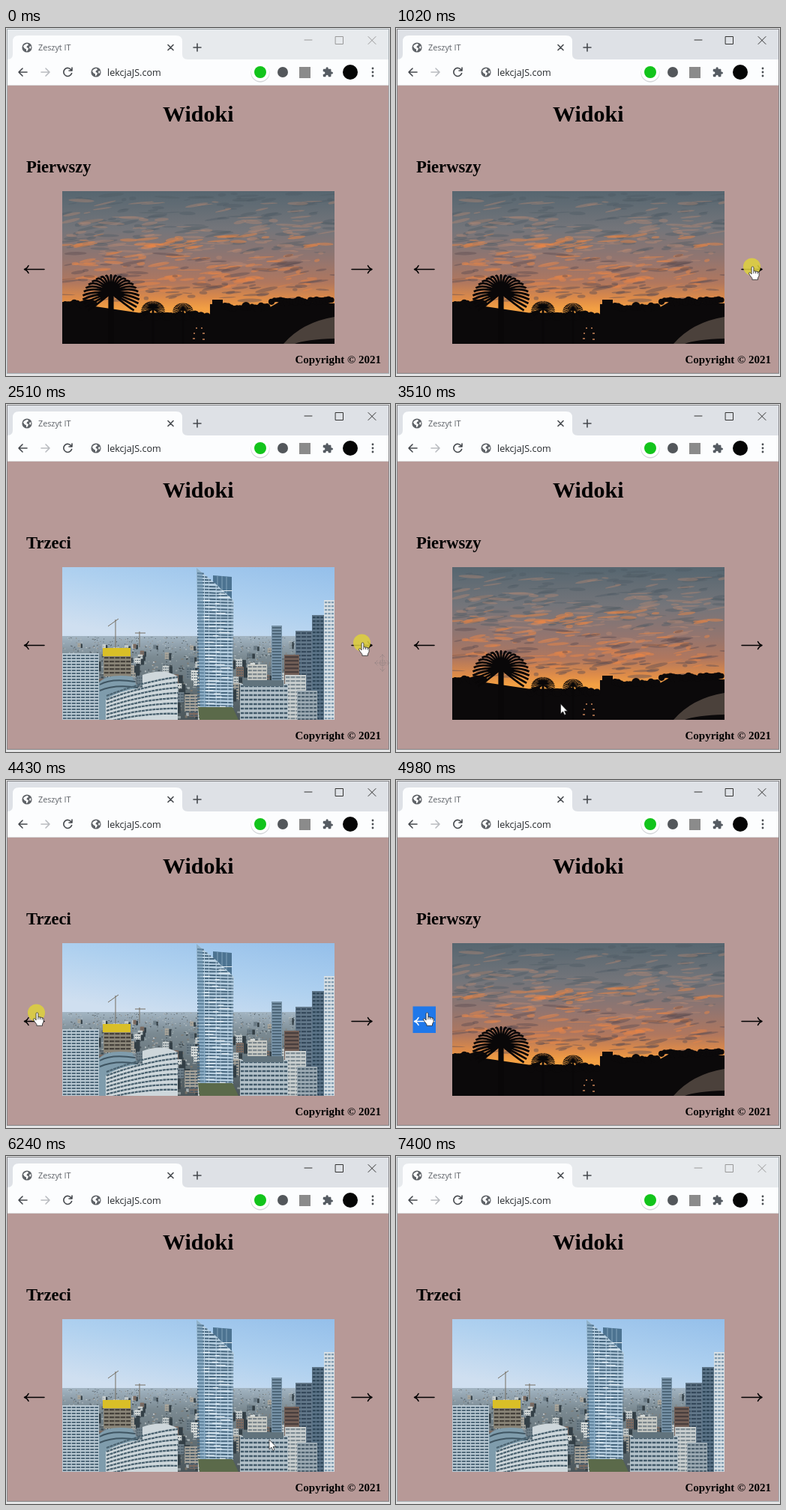
Animation, 512 px wide and 465 px high, one loop 7490 ms. Source, as an HTML page:

```html
<!DOCTYPE html>
<html lang="pl">
<head>
<meta charset="utf-8">
<title>Widoki</title>
<style>
  html, body { margin: 0; width: 100%; height: 100%; overflow: hidden; background: #e4e4e5; }
  svg { display: block; width: 512px; height: 465px; }
  .ui { font-family: "Open Sans", "Noto Sans", sans-serif; }
  .page { font-family: "Liberation Serif", serif; font-weight: bold; }
  .line { fill: none; stroke-linecap: round; stroke-linejoin: round; }
</style>
</head>
<body>
<svg viewBox="0 0 512 465">
  <defs>
    <clipPath id="frame"><rect x="75" y="218" width="363" height="204"/></clipPath>
    <linearGradient id="dusk" x2="0" y2="1">
      <stop offset="0" stop-color="#566670"/><stop offset=".25" stop-color="#74757a"/>
      <stop offset=".45" stop-color="#93756f"/><stop offset=".6" stop-color="#b0775e"/>
      <stop offset=".7" stop-color="#dc8a49"/><stop offset=".77" stop-color="#f3a043"/>
    </linearGradient>
    <linearGradient id="haze" x2="1" y2=".35">
      <stop offset="0" stop-color="#cbdcf1"/><stop offset=".5" stop-color="#dfe6ec"/>
      <stop offset="1" stop-color="#e6e6e3"/>
    </linearGradient>
    <linearGradient id="plain" x2="0" y2="1">
      <stop offset="0" stop-color="#b3bcc4"/><stop offset=".3" stop-color="#9a9f9f"/>
      <stop offset="1" stop-color="#777b77"/>
    </linearGradient>
    <linearGradient id="noon" x1="1" y1="0" x2=".3" y2="1">
      <stop offset="0" stop-color="#94bfea"/><stop offset=".5" stop-color="#aed0ef"/>
      <stop offset="1" stop-color="#cfdff0"/>
    </linearGradient>
    <linearGradient id="streets" x2="0" y2="1">
      <stop offset="0" stop-color="#a3b5c3"/><stop offset=".25" stop-color="#7b8a92"/>
      <stop offset="1" stop-color="#4b565a"/>
    </linearGradient>
    <g id="globe">
      <circle r="6.6" fill="#5f6368"/>
      <path d="M-5 -1.5Q-3 -5 1 -5L2 -3 0 -2 -.5 0 2 1 1 4 -1 5.3V2.5L-3.5 1ZM3 -1L5.2 -2 5.3 1 3.7 2Z" fill="#fff"/>
    </g>
  </defs>

  <rect id="edge" x="1.5" y="1.5" width="509" height="460" fill="#b79997"/>
  <rect id="bar" x="2" y="2" width="508" height="41"/>
  <path d="M2 42Q9 42 9 35V18Q9 10 17 10H227Q235 10 235 18V35Q235 42 242 42H510V76H2Z" fill="#fcfdfe"/>
  <path d="M2 76.5H510" stroke="#d9d6d8"/>

  <g class="ui">
    <use href="#globe" x="28" y="26"/>
    <text x="43" y="30" font-size="10.8" fill="#5c6066">Zeszyt IT</text>
    <use href="#globe" x="120" y="59"/>
    <text x="135" y="63.5" font-size="12.6" fill="#25282c">lekcjaJS.com</text>
  </g>
  <g class="line" stroke="#45494e" stroke-width="1.6">
    <path d="M216 22.5l7 7m0 -7l-7 7M250 26h10m-5 -5v10"/>
    <path d="M28 59H17m5 -5l-5 5 5 5"/>
    <path d="M47 59h11m-5 -5l5 5 -5 5" stroke="#b9bcc0"/>
    <path d="M87 56a5.5 5.5 0 1 0 .6 4.5M88 53v4h-4"/>
  </g>
  <path id="controls" class="line" d="M398 16h10M439.500 11.500h10v10h-10ZM483 11.500l10 10m0 -10l-10 10"/>
  <circle cx="339" cy="60" r="12.5" fill="#d4d6d9"/>
  <circle cx="339" cy="59" r="12" fill="#fff"/>
  <circle cx="339" cy="59" r="8" fill="#12c41b"/>
  <circle cx="369" cy="59" r="7" fill="#53575b"/>
  <rect x="391" y="52" width="15" height="15" fill="#8b8b8b"/>
  <path transform="translate(421.5 51.5) scale(.63)" fill="#555b62" d="M20.5 11H19V7c0-1.1-.9-2-2-2h-4V3.5a2.5 2.5 0 0 0-5 0V5H4c-1.1 0-2 .9-2 2v3.8h1.5a2.7 2.7 0 0 1 0 5.4H2V20c0 1.1.9 2 2 2h3.8v-1.5a2.7 2.7 0 0 1 5.4 0V22H17c1.1 0 2-.9 2-2v-4h1.5a2.5 2.5 0 0 0 0-5z"/>
  <circle cx="459" cy="59" r="10" fill="#050505"/>
  <path class="line" d="M489 54h0m0 5h0m0 5h0" stroke="#4b4f54" stroke-width="2.8"/>

  <g class="page">
    <text x="209" y="125" font-size="30">Widoki</text>
    <text id="caption" x="27" y="193" font-size="22.6"></text>
    <text x="500" y="448" font-size="15" text-anchor="end">Copyright © 2021</text>
  </g>

  <g id="photos" clip-path="url(#frame)"></g>

  <rect id="selection" x="22.5" y="302.5" width="30.5" height="35.5" fill="#1f78ea"/>
  <g class="line" stroke-width="1.5">
    <path id="prev" d="M24.5 322.5H51M30 317.5Q28.500 321 24.500 322.5Q28.500 324 30 327.5"/>
    <path d="M461 322.5H488M482.500 317.5Q484 321 488 322.5Q484 324 482.500 327.5" stroke="#000"/>
  </g>
  <path id="ghost" class="line" d="M502 335v22M492 346h19M499 338l3 -3 3 3M499 354l3 3 3 -3M495 343l-3 3 3 3M508 343l3 3 -3 3M499 343h6v6h-6Z" stroke="#81787a" stroke-dasharray="1 1.7"/>
  <circle id="click" r="11.5" fill="#ddd13c" opacity=".86"/>
  <g id="cursor">
    <path id="arrow" d="M0 0V13L3 10.2 5 14.6 7 13.7 5.1 9.5H9Z" fill="#fff" stroke="#222" stroke-width=".7"/>
    <g id="hand" stroke="#222" stroke-width=".8" stroke-linejoin="round">
      <path d="M-1.4 1.6C-1.4 -.1 1.4 -.1 1.4 1.6V6.2L4 6.4 6.6 7 8.6 8.2V12.5L7 15.5V17.8H-.6V16L-3.6 12 -5 9.4C-5 8 -3.4 7.8 -2.6 9L-1.4 10.4Z" fill="#fff"/>
      <path d="M1.4 6v3.500M4 6.4V9.500M6.6 7V10" fill="none"/>
    </g>
    <path id="beam" d="M-2 -6H2M0 -6V6M-2 6H2" stroke="#111" fill="none"/>
  </g>
</svg>
<script>
const LOOP = 7490;
const $ = id => document.getElementById(id);
const show = (id, on) => $(id).setAttribute('display', on ? 'inline' : 'none');
const set = (id, name, value) => $(id).setAttribute(name, value);

function seeded(seed) {
  return () => {
    seed = (seed + 0x6D2B79F5) | 0;
    let h = Math.imul(seed ^ seed >>> 15, 1 | seed);
    h ^= h + Math.imul(h ^ h >>> 7, 61 | h);
    return ((h ^ h >>> 14) >>> 0) / 4294967296;
  };
}

// SVG pieces as strings
const rect = (x, y, w, h, fill) =>
  `<rect x="${x}" y="${y}" width="${w}" height="${h}" fill="${fill}"/>`;
const shape = (d, fill, extra = '') => `<path d="${d}" fill="${fill}" ${extra}/>`;
const stroke = (d, color, width, extra = '') =>
  shape(d, 'none', `stroke="${color}" stroke-width="${width}" ${extra}`);

// Scattered small blocks, larger towards the viewer
function blocks(seed, count, top, bottom, colors) {
  const rnd = seeded(seed);
  const paths = colors.map(() => '');
  for (let i = 0; i < count; i++) {
    const depth = rnd() ** 1.4;
    const w = 1 + depth * 6 * rnd(), h = .8 + depth * 4 * rnd();
    const x = 75 + rnd() * 363, y = top + depth * (bottom - top);
    paths[i % colors.length] += `M${x.toFixed(1)} ${y.toFixed(1)}h${w.toFixed(1)}v${h.toFixed(1)}h${-w.toFixed(1)}Z`;
  }
  return paths.map((d, i) => shape(d, colors[i], 'opacity=".7"')).join('');
}

function clouds(seed, count, top, bottom, color) {
  const rnd = seeded(seed);
  let out = '';
  for (let i = 0; i < count; i++) {
    const x = 75 + rnd() * 363, y = top + rnd() * (bottom - top);
    out += `<ellipse cx="${x}" cy="${y}" rx="${3 + rnd() * 15}" ry="${.6 + rnd() * 1.9}"
      transform="rotate(${-14 + rnd() * 18} ${x} ${y})" fill="${color}"/>`;
  }
  return out;
}

function palm(x, y, r) {
  const fronds = 25;
  let d = '';
  for (let i = 0; i < fronds; i++) {
    const a = Math.PI * (-.2 + 1.4 * i / (fronds - 1));
    const dx = -Math.cos(a) * r, dy = -Math.sin(a) * r * .8;
    d += `M${x} ${y}Q${x + dx * .7} ${y + dy} ${x + dx * 1.05} ${y + dy + r * .18}`;
  }
  return stroke(d, '#090708', r / 13) + stroke(`M${x} ${y}V422`, '#090708', r / 5);
}

// Uneven treetops along a line
function trees(seed, x0, x1, y) {
  const rnd = seeded(seed);
  let out = '';
  for (let x = x0; x < x1; x += 4)
    out += `<circle cx="${x}" cy="${y + rnd() * 5}" r="${3 + rnd() * 3}" fill="#0b090a"/>`;
  return out;
}

// Facade with rows of windows and optional columns
function tower(x, y, w, wall, glass, gap = 5, cols = 0, bottom = 422) {
  let rows = '', bars = '';
  for (let j = y + 3; j < bottom; j += gap) rows += `M${x + 1} ${j}h${w - 2}`;
  for (let i = 1; i < cols; i++) bars += `M${x + w * i / cols} ${y}V${bottom}`;
  return rect(x, y, w, bottom - y, wall) + stroke(rows, glass, gap * .45) + stroke(bars, wall, 1.2);
}

// Mid-rise houses from the horizon to the front, each with a shaded side
function houses(seed, count) {
  const rnd = seeded(seed);
  const walls = ['#c9cfcf', '#8d9ba3', '#a9a59b', '#6f7f89', '#dce0de', '#7d6c62'];
  let out = '';
  for (let i = 0; i < count; i++) {
    const depth = i / count;
    const x = 75 + rnd() * 355, y = 314 + depth * 78 + rnd() * 6;
    const w = 4 + depth * 12 * (.5 + rnd()), h = 5 + depth * 20 * (.4 + rnd());
    out += tower(x, y, w, walls[i % walls.length], '#4d5e69', 3 + depth, 3, y + h) +
      rect(x + w, y + 1, w * .5, h, '#333f46');
  }
  return out;
}

function sunset() {
  const ground = 'M75 366L112 371 180 381 215 380 250 384 272 383V369H275V363H289V371L330 371 352 373 368 364 400 366 438 368V422H75Z';
  return rect(75, 218, 363, 204, 'url(#dusk)') +
    clouds(4, 110, 220, 300, 'rgba(78,90,99,.4)') +
    clouds(9, 110, 230, 318, 'rgba(196,140,114,.34)') +
    clouds(21, 120, 275, 352, 'rgba(236,134,68,.48)') +
    clouds(33, 90, 300, 364, 'rgba(94,78,82,.45)') +
    shape(ground, '#0b090a') +
    trees(3, 75, 120, 366) + trees(5, 180, 270, 382) + trees(8, 292, 352, 371) + trees(13, 354, 438, 363) +
    palm(140, 354, 36) + palm(196, 375, 15) + palm(236, 376, 13) +
    shape('M370 422Q395 393 438 386V415Q400 416 385 422Z', '#4b413b') +
    stroke('M253 401h2m5 0h2m-12 7h2m10 0h3m-16 7h3m10 1h3', '#c98458', 1.5);
}

function valley() {
  return rect(75, 218, 363, 90, 'url(#haze)') +
    shape('M75 302L150 301 240 304 340 303 372 299 410 302 438 301V310H75Z', '#b9c6d3') +
    rect(75, 306, 363, 116, 'url(#plain)') +
    blocks(7, 2000, 307, 400, ['#d5d7d5', '#62696a', '#b8bbb9', '#7c7b70']) +
    stroke('M80 386Q110 372 156 350', '#c6c5bb', 2.5) +
    shape('M340 366Q375 349 405 353T438 352V385H340Z', '#464b40') +
    shape('M75 404L110 389 150 383 185 367 215 356 237 352 260 356 290 361 330 370 370 374 400 370 438 367V422H75Z', '#363a2e') +
    shape('M120 422L190 385 240 370 285 390 340 386 390 404 438 395V422Z', '#2b2d25', 'opacity=".7"');
}

function skyscraper() {
  const rnd = seeded(26);
  let floors = '', glints = '';
  for (let y = 226; y < 404; y += 4.3) {
    const right = Math.min(303, 256 + (y - 219) * 1.1);
    floors += `M255 ${y}L${right} ${y + rnd() * 1.5}`;
    if (right > 285) glints += `M${258 + rnd() * 30} ${y + 2}h${5 + rnd() * 12}`;
  }
  return shape('M276 229L301 231V264H276Z', '#4c7391') +
    stroke('M282 230V258M288 230V260M294 231V262', '#81a3ba', 1) +
    shape('M254 219L277 238 304 263 302 330 303 406H259Z', '#b7cfe1') +
    stroke(floors, '#47677f', 2, 'stroke-dasharray="9 1 5 .7"') +
    stroke(glints, '#e6eff5', 1.2) +
    shape('M254 219L262 226 267 406H259Z', '#6f97b5', 'opacity=".55"') +
    shape('M256 405H302L310 422H258Z', '#5b6a4a');
}

function downtown() {
  let rings = '';
  for (let i = 0; i < 8; i++)
    rings += `M134 ${390 + i * 5}Q185 ${370 + i * 6} 229 ${365 + i * 7}`;
  return rect(75, 218, 363, 95, 'url(#noon)') +
    rect(75, 310, 363, 112, 'url(#streets)') +
    blocks(15, 1500, 311, 418, ['#cfd5d6', '#3c484f', '#a8b2b4', '#2e383c', '#857a6c']) +
    houses(41, 110) +
    tower(354, 296, 14, '#7893a8', '#4d6678', 4) +
    tower(386, 303, 22, '#627789', '#35495b', 5, 3) +
    tower(371, 335, 20, '#725f57', '#483e3d', 5) +
    tower(322, 348, 26, '#c8cac5', '#7b868c', 5, 4) +
    tower(372, 362, 28, '#cbd0d0', '#7c8a92', 5, 4) +
    tower(408, 282, 16, '#5b7387', '#2f4759', 5, 3) +
    tower(424, 262, 14, '#d7dfe4', '#7f9bb0', 5, 3) +
    tower(388, 383, 27, '#9dabb4', '#4c606e', 5, 5) +
    tower(130, 336, 37, '#8a8578', '#45413b', 5, 5, 364) +
    rect(129, 326, 37, 11, '#d9bf27') +
    stroke('M146 326V288M136 297L150 287M178 325V304M172 306H186', '#766f62', 1) +
    tower(75, 333, 49, '#b9c9d3', '#50697a', 4, 8) +
    shape('M124 422V372Q135 360 168 364L176 380V422Z', '#7f9cac') +
    stroke('M125 375Q140 366 172 371M125 383Q145 374 176 379', '#3f5562', 2) +
    shape('M133 422V395Q150 383 182 379V362Q210 352 229 364V422Z', '#ced7db') +
    stroke(rings, '#49616f', 2.3, 'stroke-dasharray="4 .8"') +
    skyscraper() +
    tower(312, 374, 64, '#b5c3cb', '#425a6a', 6, 11) +
    rect(316, 369, 54, 8, '#61737d');
}

const captions = ['Pierwszy', 'Drugi', 'Trzeci'];
$('photos').innerHTML = [sunset, valley, downtown]
  .map((make, i) => `<g id="view${i}">${make()}</g>`).join('');

// [time, view]
const views = [[0, 0], [1100, 1], [1890, 2], [2590, 0], [3970, 2], [4510, 1], [4980, 0], [5690, 2]];
// [press, release]
const clicks = [[1020, 1180], [1810, 1960], [2510, 2590], [3890, 4050], [4430, 4510], [4830, 4980], [5610, 5690]];
// [first pose, last pose, number of poses, Bezier points]
const moves = [
  [90, 310, 4, [[381, 427], [345, 355]]],
  [460, 850, 6, [[352, 353], [420, 352], [475.5, 318.5]]],
  [3200, 3740, 8, [[455, 345], [250, 482], [41.5, 310.5]]],
  [5840, 6070, 4, [[62, 330], [200, 392], [346, 394]]],
  [6240, 6930, 10, [[351, 379], [372, 338], [405, 362], [417, 444]]],
  [7020, 7095, 2, [[434, 446], [451, 450]]]
];

function bezier(points, u) {
  while (points.length > 1)
    points = points.slice(1).map((p, i) => p.map((v, j) => points[i][j] + (v - points[i][j]) * u));
  return points[0];
}

function pointer(t) {
  const [start, end, count, points] = moves.filter(m => t >= m[0]).pop() || moves[0];
  const last = count - 1;
  const step = Math.floor((t - start + 4) / ((end - start) / last));
  return bezier(points, Math.max(0, Math.min(last, step)) / last);
}

function pointerKind(x, y) {
  const onArrow = Math.abs(x - 474) < 16 || Math.abs(x - 38) < 16;
  if (onArrow && y > 302 && y < 338) return 'hand';
  return x > 386 && y > 436 && y < 449 ? 'beam' : 'arrow';
}

function draw(t) {
  const active = t >= 1020 && t < 7400;
  set('bar', 'fill', active ? '#dee1e6' : '#e7eaed');
  set('edge', 'stroke', active ? '#858588' : '#a3abb0');
  set('controls', 'stroke', active ? '#333' : '#999');

  const view = views.filter(v => t >= v[0]).pop()[1];
  captions.forEach((_, i) => show('view' + i, i === view));
  $('caption').textContent = captions[view];

  const selected = t >= 4830 && t < 5610;
  show('selection', selected);
  set('prev', 'stroke', selected ? '#fff' : '#000');
  show('ghost', t >= 1100 && t < 3200);
  set('ghost', 'opacity', t < 2110 ? .9 : .6);

  const [x, y] = pointer(t);
  const kind = pointerKind(x, y);
  show('cursor', t >= 90 && t < 7170);
  set('cursor', 'transform', `translate(${x.toFixed(1)} ${y.toFixed(1)})`);
  ['arrow', 'hand', 'beam'].forEach(k => show(k, k === kind));
  show('click', clicks.some(([a, b]) => t >= a && t < b));
  set('click', 'cx', x - 1);
  set('click', 'cy', y + .5);
}

const begin = performance.now();
function tick() {
  draw((performance.now() - begin) % LOOP);
  requestAnimationFrame(tick);
}
tick();
</script>
</body>
</html>
```
